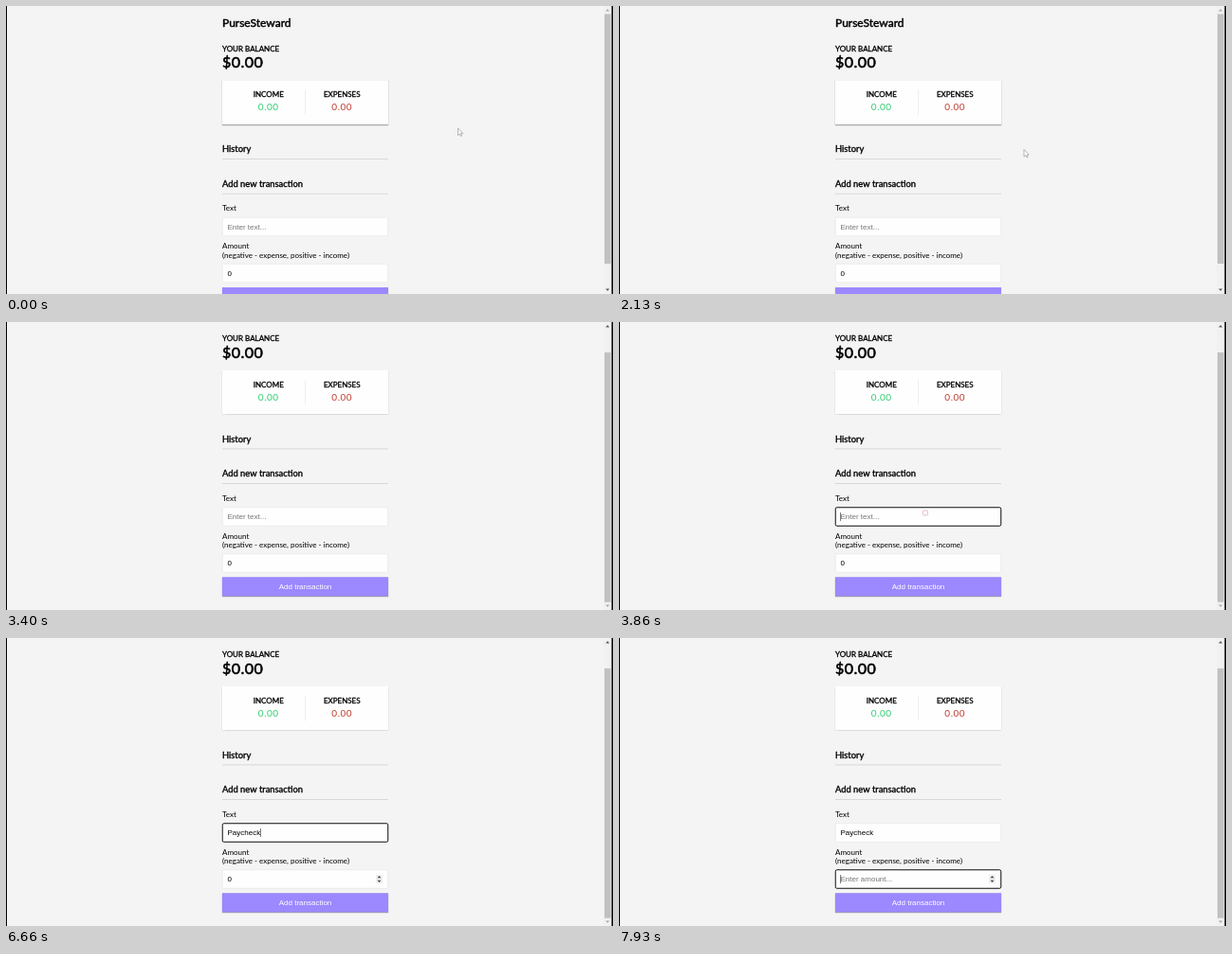
Recreate the animation shown at these times as an HTML page with a canvas. Size 640 by 304 pixels, loop 8 s.

```html
<!DOCTYPE html>
<html lang="en">
<head>
<meta charset="utf-8">
<title>PurseSteward</title>
<style>
  html, body { margin: 0; width: 100%; height: 100%; overflow: hidden; background: #f4f4f4; }
  canvas { display: block; width: 640px; height: 304px; }
</style>
</head>
<body>
<canvas id="stage" width="640" height="304"></canvas>
<script>
const ctx = document.getElementById('stage').getContext('2d');
const LOOP = 8000;
const LATO = 'Lato, sans-serif';
const ARIAL = '"Liberation Sans", Arial, sans-serif';

// The page is laid out at 1280 x 608 and drawn at half size.
const LEFT = 456, WIDTH = 350, MID = LEFT + WIDTH / 2;
const TEXT_Y = 446, AMOUNT_Y = 544, FIELD_H = 40;
const SCROLL = 55;

const FOCUS_TEXT = 3730, FOCUS_AMOUNT = 6860, CLEARED = 7730;
const WORD = 'Paycheck';
const KEYS = [4600, 4800, 4930, 5060, 5200, 5330, 5460, 5600];
const BLINK = 530;

// Pointer stops: time, x, y
const PATH = [
  [0, 953, 258], [900, 953, 258], [1300, 972, 270], [1730, 962, 296],
  [1960, 900, 314], [2130, 854, 303], [3070, 854, 303], [3400, 646, 402]
];

const clamp = v => Math.max(0, Math.min(1, v));
const smooth = v => v * v * (3 - 2 * v);

function pointerAt(t) {
  let i = 0;
  while (i < PATH.length - 2 && t >= PATH[i + 1][0]) i++;
  const a = PATH[i], b = PATH[i + 1];
  const k = smooth(clamp((t - a[0]) / (b[0] - a[0])));
  return [a[1] + (b[1] - a[1]) * k, a[2] + (b[2] - a[2]) * k];
}

function scrollAt(t) {
  if (t < 2400) return 0;
  return t < 2460 ? SCROLL * 0.6 : SCROLL;
}

function rect(x, y, w, h, color) {
  ctx.fillStyle = color;
  ctx.fillRect(x, y, w, h);
}

function poly(points, color) {
  ctx.beginPath();
  points.forEach(([x, y]) => ctx.lineTo(x, y));
  ctx.closePath();
  ctx.fillStyle = color;
  ctx.fill();
}

function text(str, x, y, size, opt = {}) {
  const { font = LATO, color = '#000', align = 'left', bold = false, space = 0 } = opt;
  ctx.font = `${size}px ${font}`;
  ctx.letterSpacing = space + 'px';
  ctx.textAlign = align;
  ctx.fillStyle = color;
  ctx.fillText(str, x, y);
  if (bold) {
    ctx.strokeStyle = color;
    ctx.lineWidth = size / 26;
    ctx.lineJoin = 'round';
    ctx.strokeText(str, x, y);
  }
  const w = ctx.measureText(str).width;
  ctx.letterSpacing = '0px';
  return w;
}

function card(y, h, color) {
  for (const [blur, alpha] of [[1.5, 0.12], [1, 0.24]]) {
    ctx.shadowColor = `rgba(0,0,0,${alpha})`;
    ctx.shadowBlur = blur;
    ctx.shadowOffsetY = 0.5;
    rect(LEFT, y, WIDTH, h, color);
  }
  ctx.shadowColor = 'transparent';
}

function heading(str, y) {
  text(str, LEFT, y, 18.72, { bold: true });
  rect(LEFT, y + 14, WIDTH, 1, '#bbb');
}

function total(label, value, x, color) {
  text(label, x, 192.6, 16, { bold: true, align: 'center' });
  text(value, x, 220.6, 20, { color, align: 'center', space: 1 });
}

function field(y, value, hint, focused, caret) {
  ctx.beginPath();
  ctx.roundRect(LEFT + 0.5, y + 0.5, WIDTH - 1, FIELD_H - 1, 2);
  ctx.fillStyle = '#fefefe';
  ctx.fill();
  ctx.strokeStyle = '#dedede';
  ctx.lineWidth = 1;
  ctx.stroke();
  if (focused) {
    ctx.beginPath();
    ctx.roundRect(LEFT + 0.5, y + 0.5, WIDTH - 1, FIELD_H - 1, 3);
    ctx.strokeStyle = '#101010';
    ctx.lineWidth = 2;
    ctx.stroke();
  }
  const x = LEFT + 11, base = y + 25.7;
  const w = text(value || hint, x, base, 16, { font: ARIAL, color: value ? '#000' : '#757575' });
  if (caret) rect(x + (value ? w : 0), y + 11, 1, 18, '#000');
}

function spinner(y) {
  const x = LEFT + 331;
  rect(x - 7, y + 11, 14, 18, '#efefef');
  poly([[x - 4, y + 17.5], [x + 4, y + 17.5], [x, y + 13]], '#444');
  poly([[x - 4, y + 22.5], [x + 4, y + 22.5], [x, y + 27]], '#444');
}

function page(t) {
  text('PurseSteward', LEFT, 44, 24, { bold: true });
  text('YOUR BALANCE', LEFT, 95, 16, { bold: true });
  text('$0.00', LEFT, 130, 32, { bold: true, space: 1 });

  card(157, 93, '#fefefe');
  rect(MID - 1, 177, 1, 53, '#dedede');
  total('INCOME', '0.00', MID - 77.5, '#2ecc71');
  total('EXPENSES', '0.00', MID + 77.5, '#c0392b');

  heading('History', 308.4);
  heading('Add new transaction', 381.8);

  const typed = KEYS.filter(k => k <= t).length;
  const inText = t >= FOCUS_TEXT && t < FOCUS_AMOUNT;
  const inAmount = t >= FOCUS_AMOUNT;
  const since = inAmount ? FOCUS_AMOUNT + 10 : typed ? KEYS[typed - 1] : FOCUS_TEXT;
  const lit = Math.floor(Math.max(0, t - since) / BLINK) % 2 === 0;

  text('Text', LEFT, 432.6, 16);
  field(TEXT_Y, WORD.slice(0, typed), 'Enter text...', inText, inText && lit);
  text('Amount', LEFT, 512, 16);
  text('(negative - expense, positive - income)', LEFT, 531, 16);
  field(AMOUNT_Y, t < CLEARED ? '0' : '', 'Enter amount...', inAmount, inAmount && lit);
  if (t >= 6400) spinner(AMOUNT_Y);

  card(594, 39.5, '#9c88ff');
  text('Add transaction', MID, 619.5, 16, { font: ARIAL, color: '#fff', align: 'center' });
}

function scrollbar(scroll) {
  const x = 1260;
  rect(x, 0, 17, 608, '#f1f1f1');
  rect(x + 2, 17 + scroll * 0.86, 13, 527, '#c1c1c1');
  const up = scroll > 0 ? '#505050' : '#a3a3a3';
  const down = scroll < SCROLL ? '#505050' : '#a3a3a3';
  poly([[x + 4.5, 11], [x + 12.5, 11], [x + 8.5, 6.5]], up);
  poly([[x + 4.5, 597], [x + 12.5, 597], [x + 8.5, 601.5]], down);
}

function pointer(t) {
  const [x, y] = pointerAt(t);
  if (t >= 3400 || y > 390) return;
  ctx.save();
  ctx.translate(x, y);
  poly([[0, 0], [0, 15], [3.5, 12], [6, 17], [8.2, 16], [6, 11], [10.5, 11]], '#fff');
  ctx.strokeStyle = '#70707a';
  ctx.lineWidth = 1;
  ctx.stroke();
  ctx.restore();
}

function clickMark(t) {
  const k = (t - FOCUS_TEXT) / 200;
  if (k < 0 || k >= 1) return;
  const r = 3 + 3 * k;
  ctx.beginPath();
  ctx.roundRect(646 - r, 403 - r, 2 * r, 2 * r, 2.5);
  ctx.strokeStyle = '#e2a3a8';
  ctx.lineWidth = 1.5;
  ctx.stroke();
}

function draw() {
  const t = performance.now() % LOOP;
  const scroll = scrollAt(t);
  ctx.setTransform(0.5, 0, 0, 0.5, 0, 0);
  rect(0, 0, 1280, 608, '#f4f4f4');
  ctx.save();
  ctx.translate(0, -scroll);
  page(t);
  ctx.restore();
  scrollbar(scroll);
  rect(0, 0, 2, 608, '#000');
  rect(1277, 0, 3, 608, '#000');
  clickMark(t);
  pointer(t);
  requestAnimationFrame(draw);
}
draw();
</script>
</body>
</html>
```
